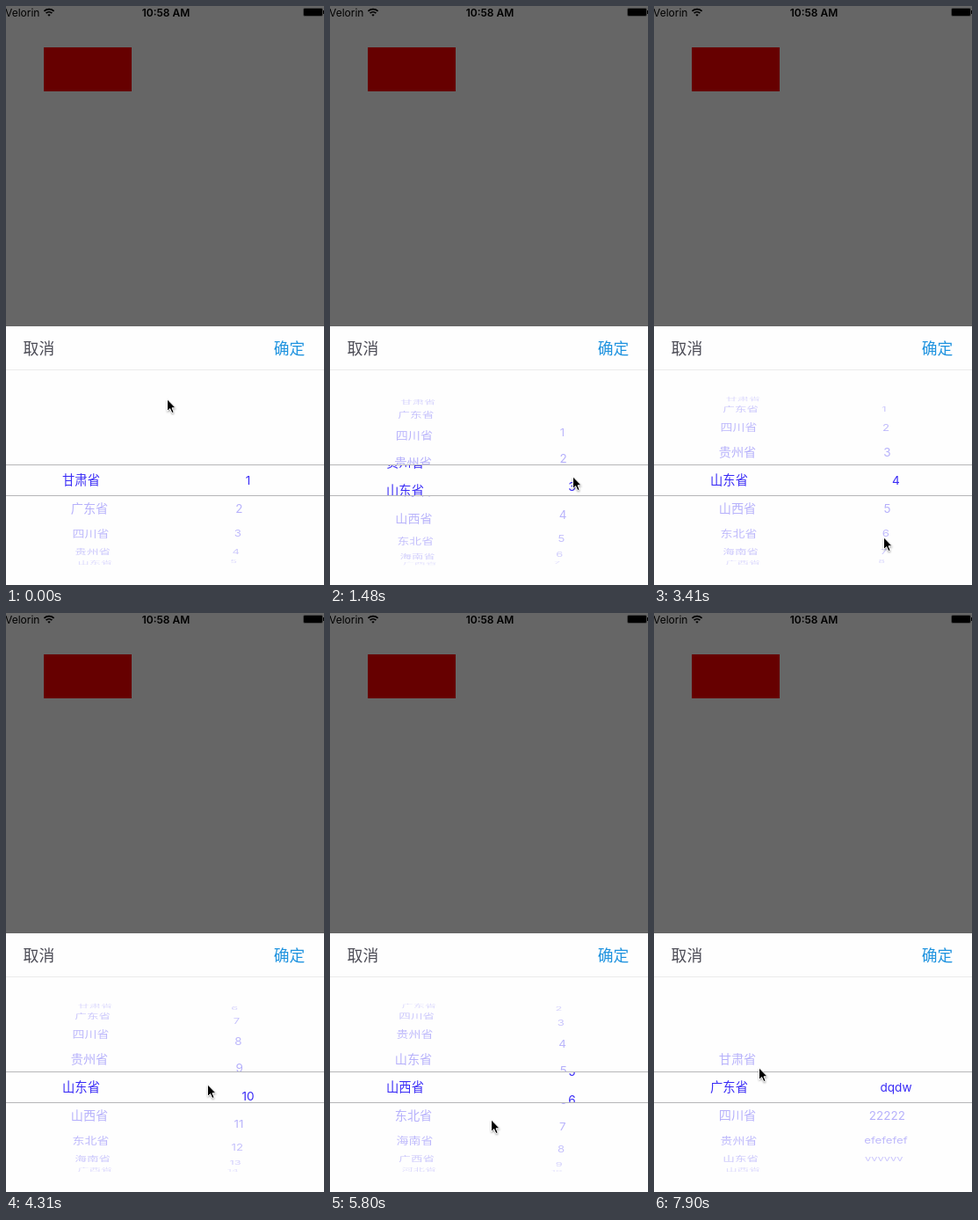
These frames come from a looping animation (362 px wide and 658 px high, 8000 ms). An HTML page:

```html
<!DOCTYPE html>
<html lang="zh">
<head>
<meta charset="utf-8">
<title>Picker</title>
<style>
  html, body { margin: 0; width: 100%; height: 100%; overflow: hidden; background: #666; }
  svg { display: block; width: 362px; height: 658px; }
  text { font-family: Inter, "Noto Sans CJK SC", "Noto Sans CJK", sans-serif; }
  .cjk { font-family: "Noto Sans CJK SC", "Noto Sans CJK", sans-serif; }
  .row { fill: #3a2cf6; text-anchor: middle; font-size: 13.6px; }
  .row.cjk { font-size: 14.3px; }
  .btn { font-size: 17.8px; }
</style>
</head>
<body>
<svg viewBox="0 0 362 658">
  <defs>
    <clipPath id="outside"><path d="M0 442H362V521H0ZM0 557H362V636H0Z"/></clipPath>
    <clipPath id="band"><path d="M0 522H362V556H0Z"/></clipPath>
    <filter id="soft" x="-50%" y="-50%" width="200%" height="200%"><feGaussianBlur stdDeviation="1"/></filter>
  </defs>
  <rect width="362" height="658" fill="#666"/>

  <text x="-1" y="11.5" font-size="12">Velorin</text>
  <g fill="none" stroke="#000" stroke-width="1.8">
    <path d="M43.4 5.9a8.2 8.2 0 0 1 11.2 0M45.6 8.2a5 5 0 0 1 6.8 0"/>
    <path d="M47.3 9.9a2.6 2.6 0 0 1 3.4 0L49 11.8Z" fill="#000" stroke="none"/>
  </g>
  <text x="182" y="11.5" font-size="12" font-weight="600" text-anchor="middle">10:58 AM</text>
  <rect x="338.5" y="2.5" width="22" height="9" rx="1.5" fill="none" stroke="#000" stroke-opacity=".3"/>
  <rect x="339" y="3" width="21" height="8" rx="1"/>
  <rect x="361" y="5" width="2" height="4"/>

  <rect x="43" y="47" width="100" height="50" fill="#600"/>
  <rect y="364" width="362" height="294" fill="#fefefe"/>
  <text class="btn cjk" x="19.6" y="395.6" fill="#4b4b55">取消</text>
  <text class="btn cjk" x="340.4" y="395.6" fill="#1f93df" text-anchor="end">确定</text>
  <rect y="413" width="362" height="1" fill="#ebebeb"/>

  <g id="wheel" clip-path="url(#outside)"></g>
  <g id="lens" clip-path="url(#band)"></g>
  <path d="M0 521.5H362M0 556.5H362" stroke="#b6b6b8"/>

  <g id="cursor">
    <path d="M0 1V15L3.3 12L5.6 17L8 16L5.8 11H10.3Z" opacity=".4" filter="url(#soft)" transform="translate(.5 1.2)"/>
    <path d="M.5 .8V14.6L3.7 11.6L5.9 16.6L8.2 15.6L6 10.8H10.2Z" stroke="#fff"/>
  </g>
</svg>
<script>
const LOOP = 8000, STEP = 149, MID = 539, AXIS = 181;
const RADIUS = 107, ANGLE = 17.6 * Math.PI / 180, DEPTH = 830, PITCH = 32, REACH = 4.45;

const provinces = '甘肃省 广东省 四川省 贵州省 山东省 山西省 东北省 海南省 广西省 河北省'.split(' ');
const numbers = Array.from({ length: 20 }, (_, i) => String(i + 1));
const words = ['dqdw', '22222', 'efefefef', 'vvvvvv'];

// Spins of a wheel: start step, duration in steps, rows travelled.
const leftSpins = [[2, 6, 3.63], [11, 2, .37], [34, 3, 1], [45, 2, -2], [49, 4, -2]];
const rightSpins = [[8, 2, 1.77], [10, 3, 1.23], [17, 2, .7], [19, 4, -.7],
  [25, 8, 7.57], [37, 1, -6], [39, 3, -4.97], [42, 2, .4]];

// Pointer stops: step, x, y.
const stops = [[0, 183, 446], [2, 100, 575], [4, 96, 510], [8, 262, 592], [10, 276, 534],
  [17, 261, 603], [25, 261, 603], [27, 264, 525], [34, 87, 575], [36, 90, 550],
  [39, 183, 575], [41, 264, 560], [45, 96, 470], [49, 96, 469], [53, 119, 516]];

const wheel = document.getElementById('wheel');
const lens = document.getElementById('lens');
const cursor = document.getElementById('cursor');

const clamp = u => Math.min(1, Math.max(0, u));
const glide = u => 1 - (1 - u) ** 2;
const smooth = u => u * u * (3 - 2 * u);

function spun(spins, k) {
  return spins.reduce((sum, [from, len, rows]) => sum + rows * glide(clamp((k - from) / len)), 0);
}

function pointer(k) {
  const i = Math.max(1, stops.findIndex(s => s[0] >= k));
  const [k0, x0, y0] = stops[i - 1], [k1, x1, y1] = stops[i];
  const u = smooth((k - k0) / (k1 - k0));
  return [x0 + (x1 - x0) * u, y0 + (y1 - y0) * u];
}

function row(label, cjk, transform, alpha) {
  return `<text class="row${cjk ? ' cjk' : ''}" y="${cjk ? 5.4 : 5}" opacity="${alpha}" transform="${transform}">${label}</text>`;
}

function column(items, pos, side, lensX, cjk) {
  let far = '', near = '';
  items.forEach((label, i) => {
    const n = i - pos;
    if (Math.abs(n) > REACH) return;
    const c = Math.cos(n * ANGLE), p = 1 / (1 + RADIUS * (1 - c) / DEPTH);
    const x = AXIS + side * p, y = MID + RADIUS * Math.sin(n * ANGLE) * p;
    far += row(label, cjk, `translate(${x} ${y}) scale(${p} ${c * p})`, .06 + .32 * c);
    if (Math.abs(n) < 1.2) near += row(label, cjk, `translate(${lensX} ${MID + n * PITCH})`, 1);
  });
  return [far, near];
}

function draw(k) {
  const left = spun(leftSpins, k);
  const [farL, nearL] = column(provinces, left, -86.5, 85.5, true);
  const [farR, nearR] = column(k >= 53 ? words : numbers, spun(rightSpins, k), 84.9, 275.5, false);
  wheel.innerHTML = farL + farR;
  lens.innerHTML = nearL + nearR;
  cursor.setAttribute('transform', `translate(${pointer(k)})`);
}

let shown = -1;
const start = performance.now();
function tick() {
  const t = (performance.now() - start) % LOOP;
  const k = Math.floor((t + 18) / STEP);
  if (k !== shown) draw(shown = k);
  requestAnimationFrame(tick);
}
tick();
</script>
</body>
</html>
```
